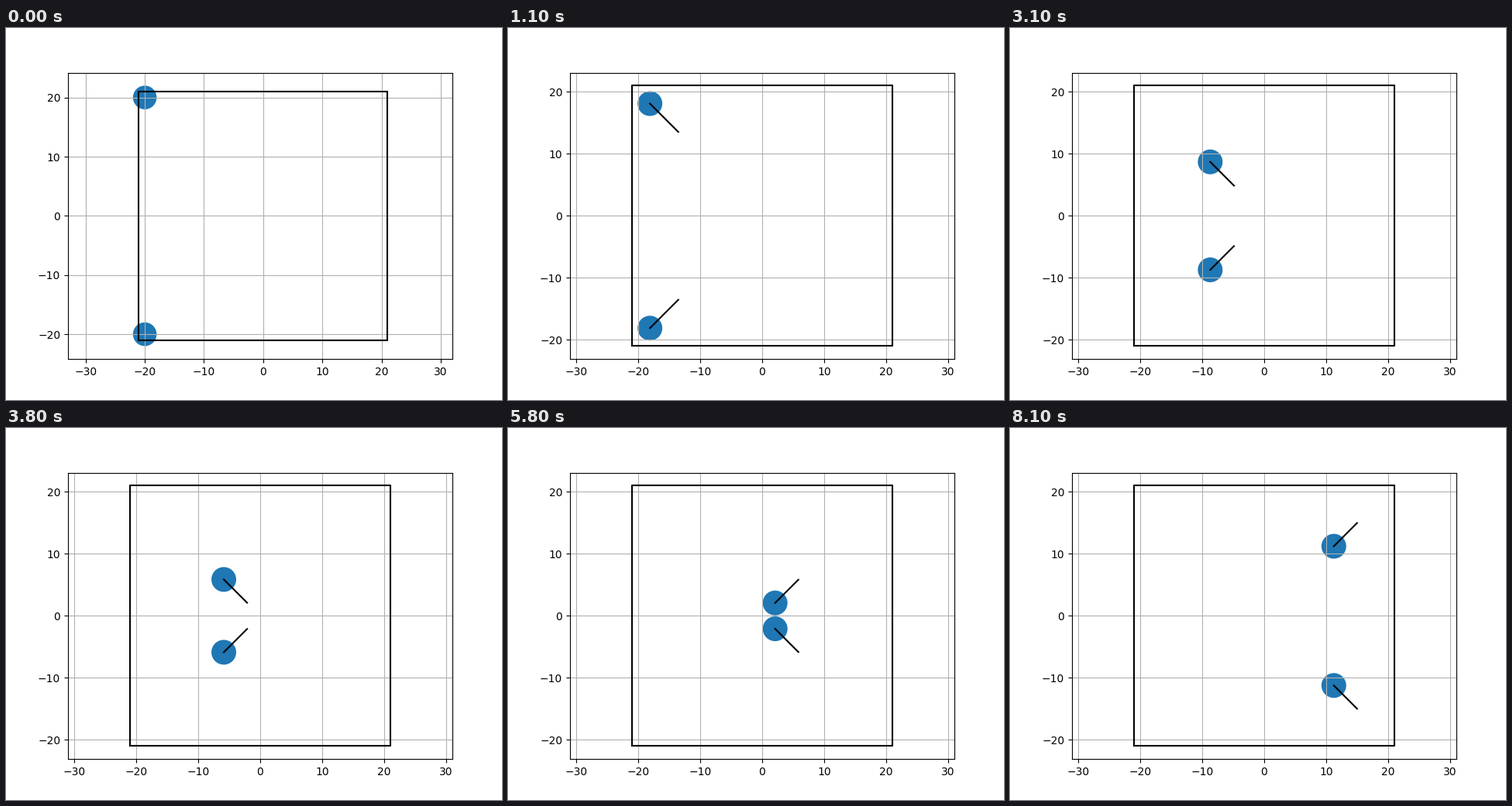
These frames come from a looping animation (640 px wide and 480 px high, 8200 ms). A matplotlib script:

```python
from math import exp

import matplotlib.pyplot as plt
from matplotlib.animation import FuncAnimation
from matplotlib.patches import Circle

FRAMES = 82
INTERVAL = 100
START = 20
RADIUS = 2
WALL = START + 1
SPEED = 0.3975      # cruising step per axis and frame
HEAD_START = 0.97   # gap between the start and the cruising line
REACH = 3.75        # heading line per axis while cruising

fig, ax = plt.subplots(figsize=(6.4, 4.8), dpi=100)


def fade(frame, width, power):
    return exp(-(frame / width) ** power)


def position(frame):
    """Rest at the start, catch up, then settle on the cruising line."""
    cruise = SPEED * frame - HEAD_START - START
    return cruise + (HEAD_START - SPEED * frame) * fade(frame, 12.35, 1.8)


def heading(frame):
    """Grow from zero, overshoot, then settle."""
    return REACH * (1 + (0.128 * frame - 1) * fade(frame, 14, 2))


def draw_agent(x, reach, side):
    ax.add_patch(Circle((x, side * x), RADIUS))
    tip = x + reach
    ax.plot([x, tip], [side * x, side * tip], "k")


def update(frame):
    ax.clear()
    ax.plot([-WALL, WALL, WALL, -WALL, -WALL],
            [-WALL, -WALL, WALL, WALL, -WALL], "k")
    for side in (1, -1):
        draw_agent(position(frame), heading(frame), side)
    ax.axis("equal")
    ax.grid(True)


anim = FuncAnimation(fig, update, frames=FRAMES, interval=INTERVAL,
                     init_func=lambda: update(0), repeat=True, repeat_delay=0)
plt.show()
```
